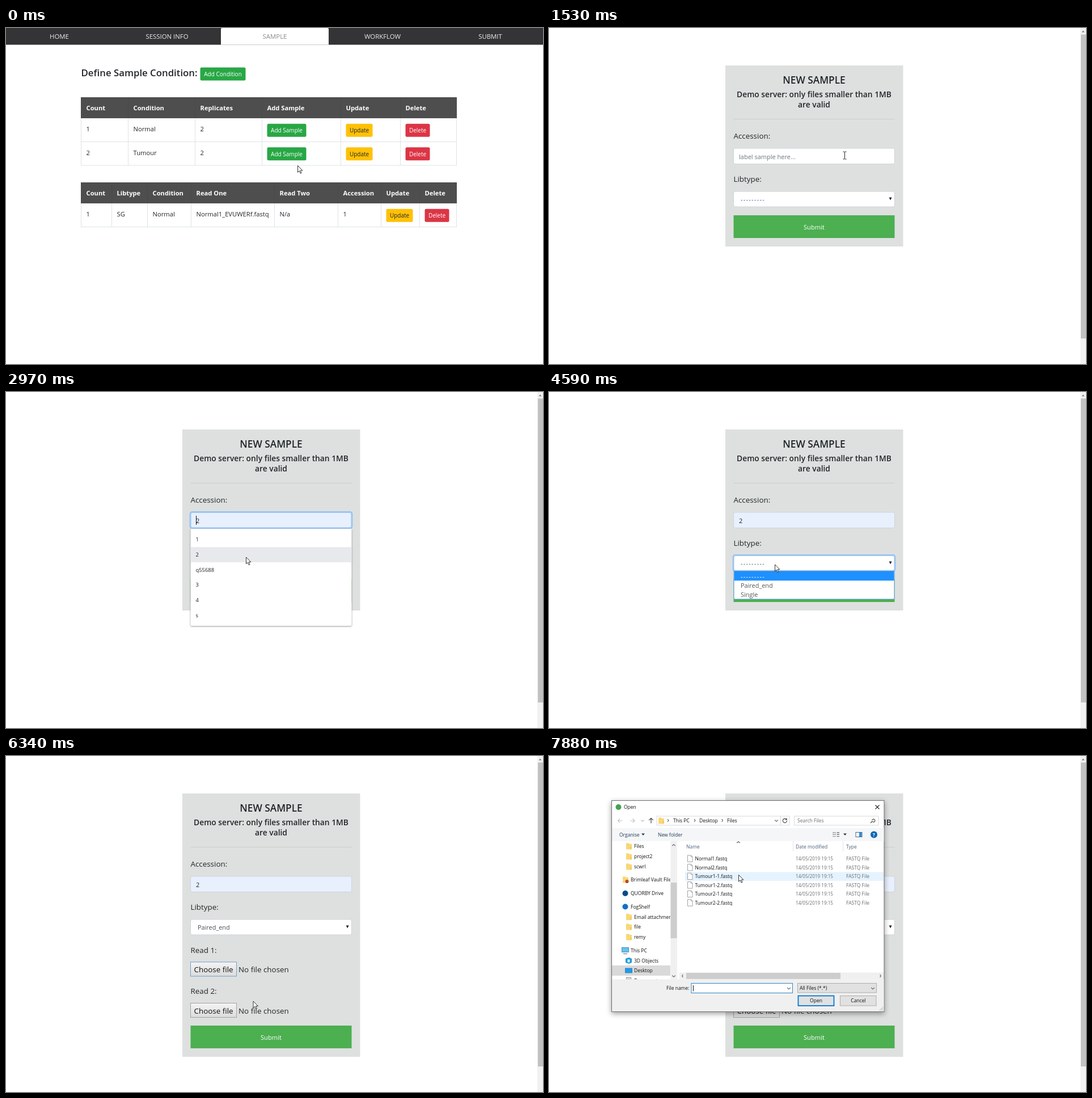
Animation, 947 px wide and 592 px high, one loop 8000 ms. Source, as an HTML page:

```html
<!DOCTYPE html>
<html lang="en">
<head>
<meta charset="utf-8">
<title>New sample form</title>
<style>
html, body { margin: 0; width: 100%; height: 100%; overflow: hidden; background: #fff; }
svg { display: block; width: 100%; height: 100%; font-family: "Open Sans", "Noto Sans", sans-serif; }
text { white-space: pre; }
#dialog { filter: drop-shadow(0 3px 5px rgba(0,0,0,.38)); }
#list { filter: drop-shadow(0 1px 1.5px rgba(0,0,0,.4)); }
</style>
</head>
<body>
<svg id="stage" viewBox="0 0 947 592"></svg>
<script>
const LOOP = 8000;
const INK = '#212529';

// Markup helpers
const rect = (x, y, w, h, fill, more = '') =>
  `<rect x="${x}" y="${y}" width="${w}" height="${h}" fill="${fill}" ${more}/>`;
const text = (x, y, s, size, fill = INK, more = '') =>
  `<text x="${x}" y="${y}" font-size="${size}" fill="${fill}" ${more}>${s}</text>`;
const mid = (x, y, s, size, fill, more = '') => text(x, y, s, size, fill, `text-anchor="middle" ${more}`);
const line = (d, stroke, width = 1, more = '') =>
  `<path d="${d}" fill="none" stroke="${stroke}" stroke-width="${width}" ${more}/>`;
const shape = (d, fill, more = '') => `<path d="${d}" fill="${fill}" ${more}/>`;
const dot = (x, y, r, fill) => `<circle cx="${x}" cy="${y}" r="${r}" fill="${fill}"/>`;
const group = (id, body, more = '') => `<g id="${id}" ${more}>${body}</g>`;
const bold = 'font-weight="700"', semi = 'font-weight="600"';
const border = c => `stroke="${c}"`;
const caretDown = (x, y, c = '#222') => shape(`M${x - 3} ${y - 1.5}h6l-3 3.4z`, c);
const chevron = (x, y, dx, dy, c = '#555') =>
  line(dx ? `M${x - dx} ${y - 2.5}l${2 * dx} 2.5l${-2 * dx} 2.5` : `M${x - 2.8} ${y - dy}l2.8 ${2 * dy}l2.8 ${-2 * dy}`, c, 1.1);

// Sample table page
const BTN = {
  'Add Condition': ['#28a745', '#fff', 80], 'Add Sample': ['#28a745', '#fff', 69],
  Update: ['#ffc107', INK, 47], Delete: ['#dc3545', '#fff', 43]
};
function button(x, y, label, id = '') {
  const [bg, fg, w] = BTN[label];
  return rect(x, y, w, 23, bg, `rx="2.5" ${id && `id="${id}"`}`) + mid(x + w / 2, y + 15.3, label, 10, fg);
}
function table(top, cols, heads, rows) {
  const bottom = top + 37 + rows.length * 41.5;
  let out = rect(132, top, 662, 37, '#4e4e4e');
  cols.forEach((x, i) => {
    out += line(`M${x + .5} ${top}v37`, '#464a4d') + line(`M${x + .5} ${top + 37}V${bottom}`, '#dee2e6');
    if (heads[i]) out += text(x + 9.5, top + 23, heads[i], 11.2, '#fff', bold);
  });
  rows.forEach((row, r) => {
    const y = top + 37 + r * 41.5;
    out += line(`M132 ${y + 41.5}h663`, '#dee2e6');
    row.forEach((cell, i) => {
      const x = cols[i] + 9.5;
      out += BTN[cell] ? button(x, y + 9.8, cell, cell == 'Add Sample' && r ? 'addBtn' : '')
                       : text(x, y + 23, cell, 11.2);
    });
  });
  return out;
}
function tablePage() {
  let out = rect(0, 0, 947, 29.5, '#343437') + shape('M379 29.5V2q0-2 2-2h186q2 0 2 2v27.5z', '#fff');
  ['HOME', 'SESSION INFO', 'SAMPLE', 'WORKFLOW', 'SUBMIT'].forEach((s, i) => {
    out += mid(94 + i * 190, 19, s, 11.4, i == 2 ? '#8a8a8a' : '#ececec');
  });
  out += text(132.5, 85, 'Define Sample Condition:', 16.8, INK, semi) + button(342.5, 69.5, 'Add Condition');
  out += rect(459.5, 208.8, 72, 26, 'none', 'id="addRing" rx="4" stroke="#28a745" stroke-opacity=".5" stroke-width="3"');
  out += table(122, [132, 215, 333, 451, 590, 695, 794],
    ['Count', 'Condition', 'Replicates', 'Add Sample', 'Update', 'Delete'],
    [['1', 'Normal', '2', 'Add Sample', 'Update', 'Delete'], ['2', 'Tumour', '2', 'Add Sample', 'Update', 'Delete']]);
  out += table(272, [132, 186, 249, 326, 473, 585, 661, 729, 794],
    ['Count', 'Libtype', 'Condition', 'Read One', 'Read Two', 'Accession', 'Update', 'Delete'],
    [['1', 'SG', 'Normal', 'Normal1_EVUWERf.fastq', 'N/a', '1', 'Update', 'Delete']]);
  return out;
}

// Form page
const label = (y, s) => text(325.5, y, s, 13.4);
const dashes = (y, fill, id = '') => text(338, y, '---------', 10.9, fill, `letter-spacing="1.27" ${id}`);
const ring = (id, y, h) => rect(325, y, 285, h, 'none', `id="${id}" rx="3.5" stroke="#9cc5f2" stroke-width="3"`);
function filePicker(y, id) {
  return rect(325.5, y, 81, 25, 'url(#face)', `id="${id}" stroke="#a2a2a2"`) +
    text(331.5, y + 18, 'Choose file', 13.4, '#111') + text(410, y + 18, 'No file chosen', 13.4);
}
function formPage() {
  let out = rect(937, 0, 10, 592, '#f1f1f1') + rect(938, 11.5, 9, 535.5, '#c1c1c1') + shape('M939.5 7.5h5l-2.5-3z', '#7d7d7d');
  out += rect(311, 66, 313.5, 319, '#dee0df', 'id="card"');
  out += mid(467.5, 98.3, 'NEW SAMPLE', 17.3, INK, semi);
  out += mid(467.5, 122, 'Demo server: only files smaller than 1MB', 13.8, INK, semi) + mid(467.5, 139.6, 'are valid', 13.8, INK, semi);
  out += line('M325.5 160.5h284', '#cbcdcc') + label(195, 'Accession:') + label(271, 'Libtype:');
  out += rect(325.5, 212, 284, 27.5, '#fff', 'id="input" rx="3" stroke="#ced4da"') + ring('inputRing', 211.5, 28.5);
  out += text(335, 230.8, '', 11, INK, 'id="value"') + rect(0, 218, 1, 16, '#111', 'id="caret"');
  out += rect(325.5, 288, 284, 27, '#fff', 'rx="3" stroke="#ced4da"') + ring('selectRing', 287.5, 28);
  out += dashes(306, '#4a52a0', 'id="blank"') + text(338, 306, 'Paired_end', 10.9, '#495057', 'id="chosen"') + shape('M599.6 298.6h5l-2.5 5z', '#222');
  out += group('reads', label(346.5, 'Read 1:') + filePicker(363, 'pick') + label(418.5, 'Read 2:') + filePicker(435.5, 'pick2'));
  out += group('submit', rect(325.5, 330, 284, 40, '#4caf50') + mid(467.5, 354.5, 'Submit', 11.2, '#fff'));

  let items = rect(325.5, 241, 284, 171, '#fff', 'rx="2"') + rect(325.5, 0, 284, 26.7, '#e8e9ec', 'id="listHover"');
  ['1', '2', 'q55688', '3', '4', 's'].forEach((s, i) => { items += text(334.5, 263.3 + i * 26.7, s, 9.4, '#222'); });
  out += group('list', items);

  out += group('options', rect(326, 315.5, 283, 49.5, '#fff', border('#5b9bd5')) + rect(326.5, 316, 282, 16.3, '#1e90ff', 'id="optHover"') +
    dashes(328.5, '#fff', 'id="optBlank"') + text(338, 344.8, 'Paired_end', 10.9, '#555', 'id="optPair"') + text(338, 361, 'Single', 10.9, '#555'));
  return out;
}

// File dialog
const small = (x, y, s, fill = '#111', more) => text(x, y + 3, s, 8.5, fill, more);
const folder = (x, y) => shape(`M${x} ${y - 5.5}h5l1 1.5h4v9.5h-10z`, '#f8d775') + line(`M${x + 8} ${y + 5.5}v-4h2`, '#e5b94e', .8);
const screen = (x, y, c) => rect(x, y - 4.5, 12, 8, c, border('#2a7ab8') + ' stroke-width=".8"');
function sidebar() {
  let out = rect(111, 369, 103, 18, '#d9d9d9');
  const inner = { Files: 159, project2: 177, scwrl: 195, 'Email attachments': 283.5, file: 301, remy: 319 };
  for (const [s, y] of Object.entries(inner)) out += folder(136, y) + small(150, y, s);
  out += folder(130, 218) + dot(137.5, 221, 3, '#b5482a') + small(144, 218, 'Brimleaf Vault Files');
  out += dot(134.5, 242, 5, '#0b4a86') + small(144, 242, 'QUORBY Drive');
  out += dot(134.5, 265.5, 5, '#1070c8') + small(144, 265.5, 'FogShelf');
  out += screen(128.5, 342, '#6cc0ee') + line('M131 348.5h7', '#567', 1) + small(144, 342.5, 'This PC');
  out += shape('M135 357l6-2 5 2v7l-5 2-6-2z', '#1f9bd8') + rect(138.5, 358.5, 4, 5, '#e4f4fc') + small(150, 360.5, '3D Objects');
  out += screen(134.5, 378.5, '#1d9bea') + small(150, 378, 'Desktop');
  out += rect(136.5, 390.5, 8, 10, '#fff', border('#888')) + line('M138 393h5', '#4a88c0') + small(150, 396, 'Documents');
  return `<g clip-path="url(#side)">${out}</g>`;
}
function dialog() {
  const grey = '#6d6d6d', head = '#4c607a', nav = '#1e395b';
  let out = rect(110.5, 78.5, 480.5, 372, '#fff', border('#6f6f6f'));
  out += rect(111, 127, 479.5, 23, '#f5f6f7') + rect(111, 393.5, 479.5, 56.5, '#f0f0f0');
  out += dot(122.5, 90, 5, '#45a352') + small(132, 90, 'Open') + line('M575.5 86.5l7 7m0-7l-7 7', '#222', 1.1);
  out += line('M129.5 114h-8m3.5-3.5l-3.5 3.5 3.5 3.5M143 114h8m-3.5-3.5l3.5 3.5-3.5 3.5', '#c4c4c4', 1.1);
  out += chevron(165, 114, 0, 1, '#bbb') + line('M180 118.5v-9m-3.7 3.7l3.7-3.7 3.7 3.7', '#444', 1.2);
  out += rect(190, 106, 234, 16, '#fff', border('#d9d9d9')) + line('M408.5 106v16', '#d9d9d9') + folder(193, 114);
  [[210, 'This PC', 219], [257, 'Desktop', 265], [305.5, 'Files', 314]].forEach(([c, s, x]) => {
    out += chevron(c, 113.5, .8, 0) + small(x, 113.5, s);
  });
  out += chevron(401, 114, 0, 1.3) + line('M418.5 111.5a3.6 3.6 0 1 0 1 2.5M419.3 109.5v2.7h-2.7', '#444', 1.1);
  out += rect(432.5, 106, 148.5, 16, '#fff', border('#d9d9d9')) + small(438, 114, 'Search Files', grey);
  out += line('M567 118l3-3m-.3-1.7a2.6 2.6 0 1 1 .3 1.7', '#444', 1.1);
  out += small(124, 138.5, 'Organise', nav) + caretDown(166, 138, nav) + small(192, 138.5, 'New folder', nav) + caretDown(522, 138, '#333');
  for (let i = 0; i < 3; i++) {
    const y = 135 + i * 3.3;
    out += line(`M500.5 ${y}h2m1 0h2m2 0h4.5`, '#777', 1.4);
  }
  out += rect(541, 134.5, 11, 8, '#fff', border('#4a6a8a')) + rect(547, 135, 4.5, 7, '#2f8ad8') + dot(573, 138.5, 6, '#0a66b4') + mid(573, 141.7, '?', 9, '#fff', bold);
  out += sidebar();
  out += rect(214.5, 150, 11.5, 243.5, '#f0f0f0') + rect(214.5, 223, 11, 98, '#cdcdcd') + chevron(220, 157, 0, -1.3) + chevron(220, 388, 0, 1.3);
  out += small(242, 160, 'Name', head) + small(435, 160, 'Date modified', head) + small(524, 160, 'Type', head);
  out += line('M430.5 150v18M518.5 150v18', '#e3e3e3') + chevron(334, 152, 0, -1);
  out += rect(240, 0, 350, 15.6, '#e5f3ff', 'id="rowHover"');
  ['Normal1', 'Normal2', 'Tumour1-1', 'Tumour1-2', 'Tumour2-1', 'Tumour2-2'].forEach((s, i) => {
    const y = 181 + i * 15.55;
    out += shape(`M244.5 ${y - 6}h6l2.5 2.5v9h-8.5z`, '#fff', 'stroke="#8a8a8a" stroke-width=".8"') + line(`M250.3 ${y - 6}v2.7h2.7`, '#8a8a8a', .7);
    out += small(257.5, y, s + '.fastq') + text(435, y + 3, '14/05/2019 19:15', 8.15, grey) + small(524, y, 'FASTQ File', grey);
  });
  out += rect(230, 381.5, 360, 12, '#f0f0f0') + rect(242, 382, 272, 11, '#cdcdcd') + chevron(235.5, 387.5, -.8, 0) + chevron(584.5, 387.5, .8, 0);
  out += small(207, 409, 'File name:') + rect(251, 400.5, 178.5, 17, '#fff', border('#2f83c5')) + rect(254, 404, 1, 10.5, '#111') + chevron(423, 409.5, 0, 1.3);
  out += rect(438.5, 400.5, 139, 16.5, '#e1e1e1', 'id="filter" stroke="#adadad"') + small(442, 409, 'All Files (*.*)') + chevron(571, 409.5, 0, 1.3);
  out += rect(439.5, 422.5, 63, 17.5, '#e1e1e1', 'id="open" stroke="#0078d7"') + mid(471, 434.3, 'Open', 8.5, '#111');
  out += rect(513.5, 422.5, 63.5, 17.5, '#e1e1e1', border('#adadad')) + mid(545.5, 434.3, 'Cancel', 8.5, '#111');
  return out + line('M583 447.5h6M585.5 445h3.5M588 442.5h1', '#aaa', 1.3, 'stroke-dasharray="1.3 1.2"');
}

const cursors =
  group('arrow', shape('M0 0V11.8L2.7 9.3L4.7 13.7L6.5 12.9L4.6 8.6H8.4Z', '#fff', 'stroke="#1c1c1c" stroke-width=".9" stroke-linejoin="round"')) +
  group('hand', shape('M3 8V1.4q0-1.1 1-1.1t1 1.1V5.2q1.8-.5 2 .5q1.6-.4 1.9.6q1.7-.2 1.7 1.2V10q0 1.5-1 2.4v1.3H4V12.4Q2 10.5.5 8.3Q.3 7 1.6 7.1Z', '#fff', 'stroke="#1c1c1c" stroke-width=".9" stroke-linejoin="round"')) +
  group('beam', line('M-3 -6.5h2.2l.8.7.8-.7H3M0 -6V6M-3 6.5h2.2l.8-.7.8.7H3', '#222', 1));

const stage = document.getElementById('stage');
stage.innerHTML = `<defs><linearGradient id="face" x2="0" y2="1"><stop stop-color="#f4f4f4"/><stop offset="1" stop-color="#dcdcdc"/></linearGradient>
<linearGradient id="faceHover" x2="0" y2="1"><stop stop-color="#fbfbfb"/><stop offset="1" stop-color="#e9e9e9"/></linearGradient>
<clipPath id="side"><rect x="111" y="150" width="103" height="243.5"/></clipPath></defs>` +
  group('tables', tablePage()) + group('form', formPage()) + group('dialog', dialog()) + cursors;

const ui = {};
stage.querySelectorAll('[id]').forEach(n => { ui[n.id] = n; });
const show = (id, on) => ui[id].setAttribute('display', on ? 'inline' : 'none');
const set = (id, key, v) => ui[id].setAttribute(key, v);

// Each step changes part of the state and holds until the next
const steps = [
  [0, { page: 'tables', cur: ['arrow', 514.5, 242.5], list: -2, opt: -1, row: -1, value: '' }],
  [340, { hover: 1, cur: ['hand', 508, 215.5] }],
  [900, { cur: ['hand', 513.5, 212.5] }],
  [1100, { press: 1 }],
  [1530, { page: 'form', cur: ['beam', 521.5, 224.5] }],
  [1650, { cur: ['beam', 525, 228] }],
  [1990, { cur: ['arrow', 433.5, 239] }],
  [2200, { focus: 'input', caret: 335, cur: ['beam', 437, 229] }],
  [2310, { list: -1 }],
  [2630, { list: 0, value: '1', cur: ['arrow', 432, 261] }],
  [2970, { list: 1, value: '2', cur: ['arrow', 423.5, 291] }],
  [3300, { list: -2, caret: 342 }],
  [3940, { caret: 0, cur: ['arrow', 398.5, 304] }],
  [4590, { focus: 'select', opt: 0 }],
  [4820, { opt: 1, cur: ['arrow', 392, 330] }],
  [4930, { cur: ['arrow', 386, 341] }],
  [5040, { cur: ['arrow', 384.5, 345.5] }],
  [5360, { opt: -1, paired: 1 }],
  [5690, { cur: ['arrow', 383.5, 359] }],
  [5920, { pick: 1, cur: ['hand', 381, 371], }],
  [5921, { cur: ['arrow', 382, 372] }],
  [6130, { focus: 'pick' }],
  [6240, { pick: 0, cur: ['arrow', 412, 408] }],
  [6340, { cur: ['arrow', 436, 432] }],
  [6670, { dialog: 1, focus: '', open: 1, cur: ['arrow', 452.5, 415.5] }],
  [6880, { open: 0, filter: 1, cur: ['arrow', 446, 404] }],
  [6990, { filter: 0.5, cur: ['arrow', 400, 268.5] }],
  [7220, { filter: 0, row: 4, cur: ['arrow', 367, 241] }],
  [7330, { row: 3, cur: ['arrow', 346, 226] }],
  [7660, { row: 2, cur: ['arrow', 334.5, 209] }],
  [7880, { cur: ['arrow', 334.5, 209.5] }]
];

function render(t) {
  const s = Object.assign({}, ...steps.filter(([at]) => at <= t).map(([, change]) => change));
  const onForm = s.page == 'form';
  show('tables', !onForm);
  show('form', onForm);
  show('dialog', s.dialog);

  set('addBtn', 'fill', s.hover ? '#218838' : '#28a745');
  show('addRing', s.press);

  ui.value.textContent = s.value || 'label sample here...';
  set('value', 'fill', s.value ? INK : '#6c757d');
  set('input', 'fill', s.value ? '#e8f0fe' : '#fff');
  show('inputRing', s.focus == 'input');
  show('caret', s.caret);
  set('caret', 'x', s.caret || 0);
  show('list', s.list > -2);
  show('listHover', s.list >= 0);
  set('listHover', 'y', 246.6 + s.list * 26.7);

  show('selectRing', s.focus == 'select');
  set('blank', 'fill', t < 4590 ? '#4a52a0' : '#555');
  show('blank', !s.paired);
  show('chosen', s.paired);
  show('options', s.opt >= 0);
  set('optHover', 'y', 316 + s.opt * 16.3);
  set('optBlank', 'fill', s.opt == 0 ? '#fff' : '#555');
  set('optPair', 'fill', s.opt == 1 ? '#fff' : '#555');

  show('reads', s.paired);
  set('card', 'height', s.paired ? 464 : 319);
  set('submit', 'transform', `translate(0 ${s.paired ? 145 : 0})`);
  set('pick', 'fill', s.pick ? 'url(#faceHover)' : 'url(#face)');
  set('pick', 'stroke', s.focus == 'pick' ? '#6f9fd0' : '#a2a2a2');

  show('rowHover', s.row >= 0);
  set('rowHover', 'y', 173.3 + s.row * 15.55);
  set('open', 'fill', s.open ? '#e5f1fb' : '#e1e1e1');
  set('open', 'stroke-width', s.open ? 1 : 1.8);
  set('filter', 'fill', ['#e1e1e1', '#e3e9ee', '#e5f1fb'][2 * (s.filter || 0)]);
  set('filter', 'stroke', s.filter ? '#5c9fd6' : '#adadad');

  const [kind, x, y] = s.cur;
  ['arrow', 'hand', 'beam'].forEach(k => show(k, k == kind));
  set(kind, 'transform', `translate(${x} ${y})`);
}

function tick() {
  render(performance.now() % LOOP);
  requestAnimationFrame(tick);
}
tick();
</script>
</body>
</html>
```
